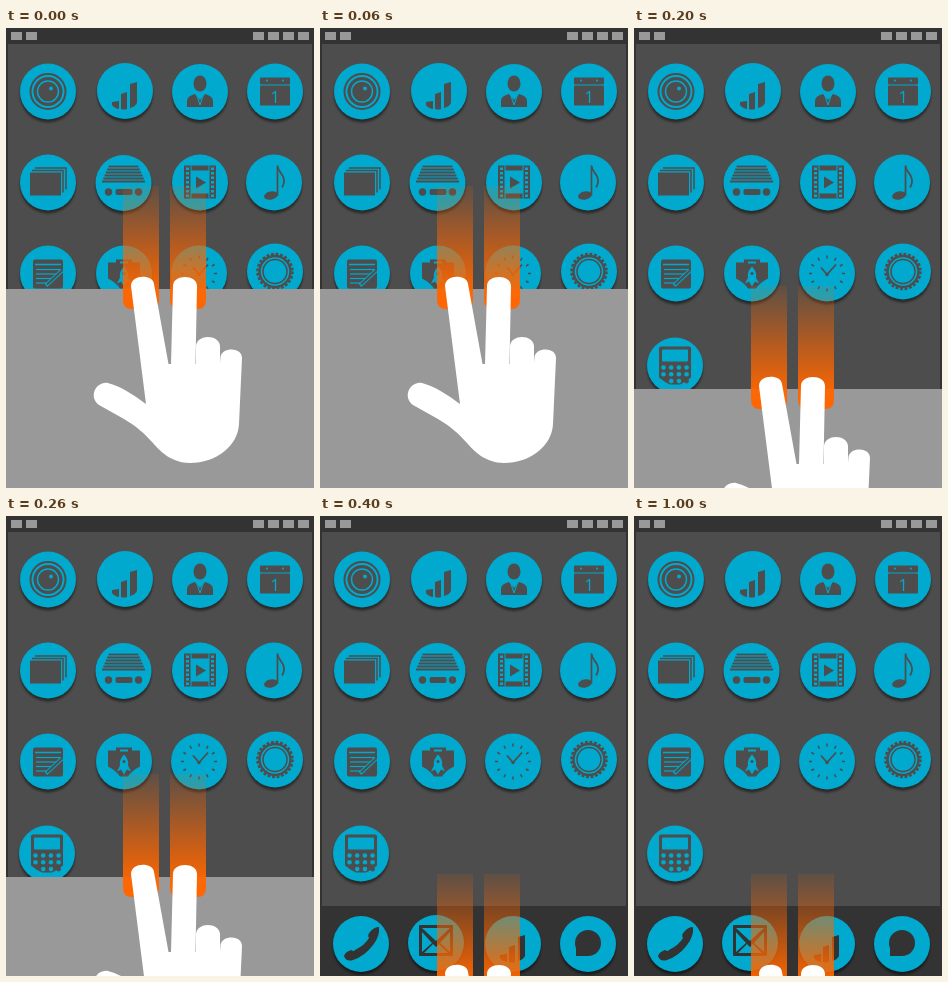
These frames come from a looping animation (308 px wide and 460 px high, 1400 ms). An HTML page:

```html
<!DOCTYPE html>
<html lang="en">
<head>
<meta charset="utf-8">
<title>Two-finger swipe</title>
<style>
html, body { margin: 0; width: 100%; height: 100%; overflow: hidden; background: #333; }
svg { display: block; width: 308px; height: 460px; }
.disc { fill: #00a9cd; filter: drop-shadow(0 3px 1px #0007); }
.icon { --ink: #4d4d4d; fill: var(--ink); }
.dock { --ink: #333; }
.b { fill: #00a9cd; }
.l { fill: none; stroke: var(--ink); }
.bl { fill: none; stroke: #00a9cd; }
text { font: 17px "Open Sans", sans-serif; text-anchor: middle; }
</style>
</head>
<body>
<svg viewBox="0 0 308 460">
  <defs>
    <linearGradient id="glow" x2="0" y2="1">
      <stop stop-color="#f60" stop-opacity=".1"/>
      <stop offset=".85" stop-color="#f60" stop-opacity=".95"/>
      <stop offset="1" stop-color="#f60"/>
    </linearGradient>
  </defs>
  <path fill="#4d4d4d" d="M2 16H306V390H2z"/>
  <path fill="#999" d="M5 4h11v8H5zM20 4h11v8H20zM247 4h11v8h-11zM262 4h11v8h-11zM277 4h11v8h-11zM292 4h11v8h-11z"/>
  <g id="icons"></g>
  <g id="swipe">
    <path fill="#999" d="M0 261H308V761H0z"/>
    <g fill="url(#glow)">
      <path d="M117 158h36v114q0 9-9 9h-18q-9 0-9-9z"/>
      <path d="M164 158h36v114q0 9-9 9h-18q-9 0-9-9z"/>
    </g>
    <path fill="#fff" d="M125 258C125 246 147 246 148 256L162.500 336H165L167 258C167 246 191 246 191 258L189.500 336H190V319C190 306 213 306 214 318V335L214.500 329C216 319 236 319 236 330L233 396C232 418 210 435 184 435C165 435 153 422 147 415C138 405 130 398 118 391L93 377C82 369 90 353 102 355C114 358 128 367 140 376z"/>
  </g>
</svg>
<script>
const circle = (x, y, r, cls = '', extra = '') =>
  `<circle cx="${x}" cy="${y}" r="${r}" class="${cls}" ${extra}/>`;
const rect = (x, y, w, h, cls = '', rx = 0) =>
  `<rect x="${x}" y="${y}" width="${w}" height="${h}" rx="${rx}" class="${cls}"/>`;
const path = (d, cls = '', width = 1) => `<path d="${d}" class="${cls}" stroke-width="${width}"/>`;
const repeat = (n, draw) => Array.from({ length: n }, (_, i) => draw(i)).join('');

const bars = path('M-13 11l7-1v8q-5-1-7-4zM-4 3l6-2v17q-3 1-6 0zM5-7l7-2v21q-2 4-7 5z');

const lens = circle(0, 0, 17.500, 'l', 'stroke-width="2"') + circle(0, 0, 14.500) +
  circle(0, 0, 10.500, 'bl', 'stroke-width="1.500"') + circle(3, -3, 2, 'b');

const person = '<ellipse cy="-8.500" rx="6.500" ry="8"/>' +
  path('M-13 15V9Q-13 4-5 2L0 8 5 2Q13 4 13 9V15z') + path('M-4 1L0 13 4 1', 'bl');

const calendar = rect(-15, -14, 30, 7, '', 1) + rect(-15, -6, 30, 20, '', 1) +
  circle(-8, -11, 1, 'b') + circle(8, -11, 1, 'b') + '<text y="11" class="b">1</text>';

const photos = rect(-18, -10, 31, 23) + path('M-16-12H15V10M-13-14.500H18V7', 'l', 1.500);

const radio = repeat(6, i => path(`M${-15 - i * 1.300} ${-16.500 + i * 3}H${15 + i * 1.300}`, 'l', 1.800)) +
  circle(-15, 9, 3.700) + circle(15, 9, 3.700) + rect(-8, 6, 17, 6, '', 2);

const film = rect(-16, -17, 32, 33) + rect(-9, -12, 18, 23, 'b') + path('M-4-6L6 0-4 6z') +
  repeat(7, i => rect(-14, -15 + i * 4.500, 3, 2.500, 'b') + rect(11, -15 + i * 4.500, 3, 2.500, 'b')) +
  path('M-9-17V16M9-17V16', 'bl');

const note = '<ellipse cx="-3" cy="13" rx="7" ry="4" transform="rotate(-12 -3 13)"/>' +
  path('M3.500 13V-17C4-9 11-9 10 0Q9 4 8 5', 'l', 1.700);

const memo = rect(-15, -14, 30, 29, '', 2) + path('M-13-9H13', 'bl', 1.500) +
  repeat(4, i => path(`M-12 ${-4 + i * 4.500}H${12 - i * 3}`, 'bl', 1.200)) +
  path('M14-3L-2 12', 'bl', 4) + path('M14-3L-1 11', 'l', 2);

const camera = path('M-8-11V-14H8V-11H16V5Q8 9 4 15H-4Q-8 9-16 5V-11z') + rect(-4, -12, 8, 2, 'b') +
  path('M0-7Q5-2 4 4L7 10 3 8 0 13-3 8-7 10-4 4Q-5-2 0-7z', 'b') + circle(0, 0, 1.500);

const clock = repeat(12, i => `<path d="M0-18V-15" class="l" stroke-width="1.500" transform="rotate(${i * 30})"/>`) +
  path('M-6-6L0 1 9-9', 'l', 1.700) + circle(0, 1, 1.700);

const badge = circle(0, 0, 17.500, 'l', 'stroke-width="2.500" stroke-dasharray="2.750 1.832"') +
  circle(0, 0, 15.500, 'l', 'stroke-width="2.500"') + circle(0, 0, 12, 'l', 'stroke-width="1.500"');

const calculator = path('M-16-17Q-16-19-14-19H14Q16-19 16-17V12Q10 17 5 19H-5Q-10 17-16 12z') +
  rect(-13, -16, 26, 12, 'b', 1) +
  repeat(11, i => {
    const row = i >> 2, shift = row === 2 ? 8 : 0;
    return circle(-11.500 + i % 4 * 7.700 + shift * (i < 10 ? .97 : .97), 2 + row * 6.800, 2.300, i === 10 ? '' : 'b');
  });

const phone = path('M-17 12Q-16 8-10 6Q-7 8-6 6Q4 1 8-6Q6-9 9-12Q13-17 18-17Q19-8 12 1Q4 12-8 16Q-15 18-17 12z');

const mail = rect(-17, -18, 34, 31, '', 1) + path('M-14-15H14L0-2zM-14-11V9L-4 0zM14-11V9L4 0zM-12 10L-3 1 0 4 3 1 12 10z', 'b');

const bubble = circle(0, -1, 13) + path('M-12 1V12H0z');

const icons = [
  [42, 63.500, lens], [119, 63, bars], [194, 64, person], [269, 63.500, calendar],
  [42, 154.500, photos], [117.500, 155, radio], [194, 154.500, film], [268, 154.500, note],
  [42, 245.500, memo], [118, 245.500, camera], [193, 245.500, clock], [269, 243.500, badge],
  [41, 337.500, calculator],
  [41, 428, phone], [116, 427, mail], [193, 428, bars], [268, 428, bubble]
];
document.getElementById('icons').innerHTML = icons.map(([x, y, art]) =>
  `<g class="icon ${y > 400 ? 'dock' : ''}" transform="translate(${x} ${y})">${circle(0, 0, 28, 'disc')}${art}</g>`
).join('');

const swipe = document.getElementById('swipe');
const start = performance.now();

// The hand drops 50px every 100ms, then rests until the loop ends.
function draw() {
  const time = (performance.now() - start) % 1400;
  const step = Math.min(4, Math.floor(time / 100));
  swipe.setAttribute('transform', `translate(0 ${step * 50})`);
  requestAnimationFrame(draw);
}
draw();
</script>
</body>
</html>
```
